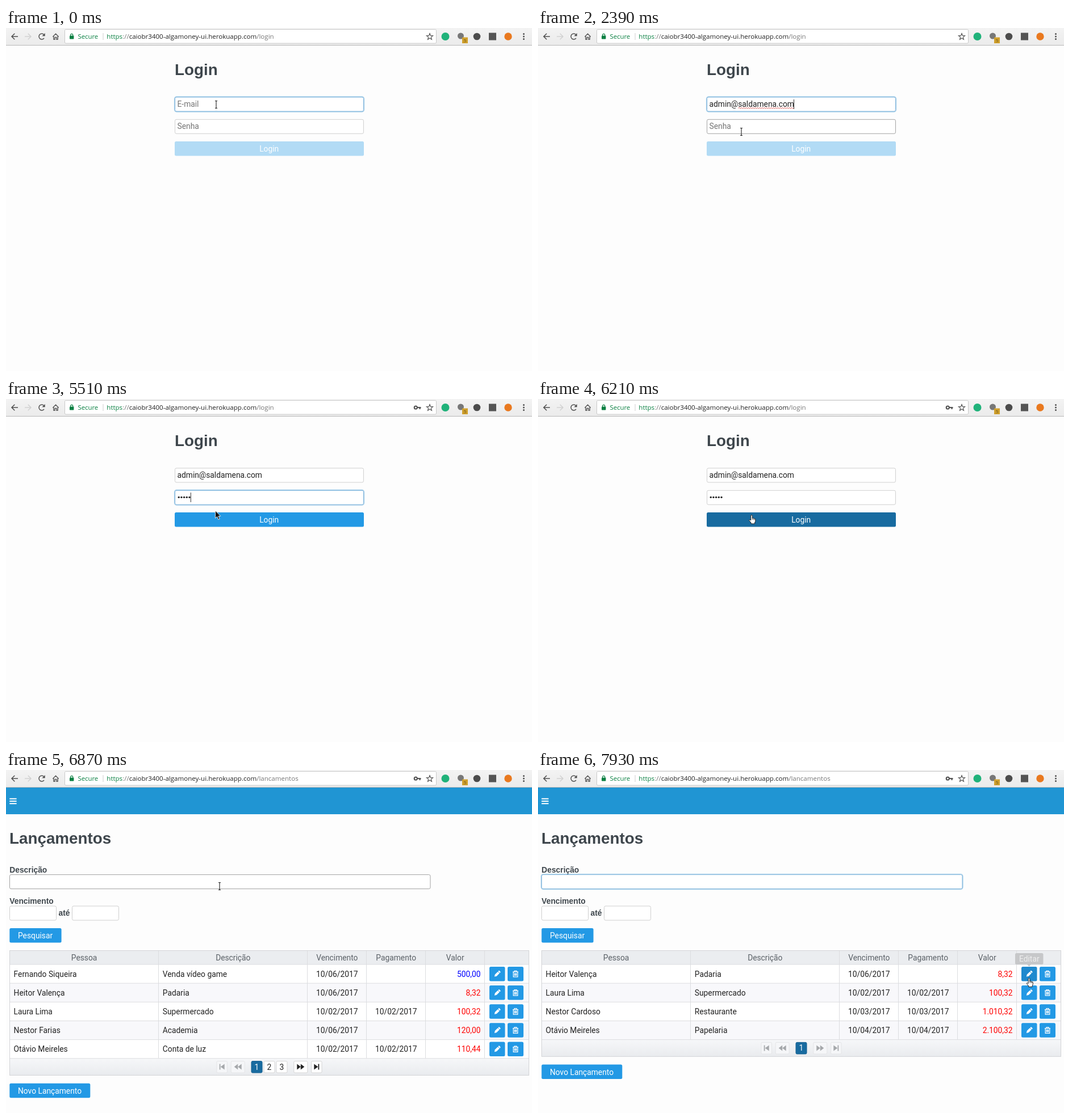
These frames come from a looping animation (926 px wide and 605 px high, 8000 ms). An HTML page:

```html
<!DOCTYPE html>
<html lang="pt">
<head>
<meta charset="utf-8">
<title>Login</title>
<style>
html, body { margin: 0; width: 100%; height: 100%; overflow: hidden; background: #fdfdfd; }
svg { display: block; width: 926px; height: 605px; }
text { font: 13.8px Roboto, sans-serif; fill: #222; white-space: pre; }
.bar { font: 11.55px "Open Sans", sans-serif; }
.h1 { font: bold 27.8px "Liberation Sans", Arial, sans-serif; fill: #3e464c; }
.label { font: bold 13.8px "Liberation Sans", Arial, sans-serif; fill: #3e464c; }
.head { fill: #5b6167; }
.hint { fill: #757575; }
.white { fill: #fff; }
.mid { text-anchor: middle; }
.end { text-anchor: end; }
</style>
</head>
<body>
<svg id="stage" viewBox="0 0 926 605">
  <defs>
    <linearGradient id="chrome" x2="0" y2="1"><stop stop-color="#f3f3f3"/><stop offset="1" stop-color="#ebebeb"/></linearGradient>
    <linearGradient id="pager" x2="0" y2="1"><stop stop-color="#f6f7f9"/><stop offset="1" stop-color="#e9ebee"/></linearGradient>
  </defs>
  <g id="page"></g>
  <g id="browser"></g>
  <g id="mouse"></g>
</svg>
<script>
const LOOP = 8000;
const BLUE = '#2399e5', HOVER = '#1f89ce', PRESSED = '#186ba0', FADED = '#b2dbf5';
const EMAIL = 'admin@saldamena.com';

// Each step keeps the values of the one before it.
const STEPS = [
  [0, { view: 'login', focus: 'email', caret: 0, typed: 0, dots: 0, key: 0, hover: '', button: FADED, mouse: ['beam', 370, 135] }],
  [680, { caret: 1 }],
  [1050, { caret: 0 }],
  [1410, { caret: 1, typed: 1 }],
  [1710, { caret: 0, mouse: ['beam', 370, 162] }],
  [2090, { hover: 'senha', mouse: ['beam', 361, 175] }],
  [2390, { caret: 1, mouse: ['beam', 358, 183] }],
  [2760, { focus: 'senha' }],
  [3100, { caret: 0 }],
  [3770, { caret: 1, dots: 1, key: 1, button: BLUE }],
  [4130, { dots: 3 }],
  [4490, { dots: 5 }],
  [5170, { caret: 0 }],
  [5510, { caret: 1, hover: '', mouse: ['arrow', 368.5, 197] }],
  [5830, { button: HOVER, mouse: ['hand', 375, 206] }],
  [6210, { focus: '', button: PRESSED, mouse: ['hand', 376, 205] }],
  [6540, { dots: 0, button: HOVER }],
  [6870, { view: 'list', hover: 'desc', result: 'all', tip: 0, mouse: ['beam', 376, 205] }],
  [7550, { focus: 'desc', hover: '', caret: 1, result: 'found', mouse: ['arrow', 845, 382] }],
  [7930, { caret: 0, tip: 1, mouse: ['hand', 864.5, 367.5] }]
];
let last = {};
const states = STEPS.map(([at, change]) => last = { ...last, ...change, at });

const RESULTS = {
  all: [
    ['Fernando Siqueira', 'Venda vídeo game', '10/06/2017', '', '500,00'],
    ['Heitor Valença', 'Padaria', '10/06/2017', '', '8,32'],
    ['Laura Lima', 'Supermercado', '10/02/2017', '10/02/2017', '100,32'],
    ['Nestor Farias', 'Academia', '10/06/2017', '', '120,00'],
    ['Otávio Meireles', 'Conta de luz', '10/02/2017', '10/02/2017', '110,44']
  ],
  found: [
    ['Heitor Valença', 'Padaria', '10/06/2017', '', '8,32'],
    ['Laura Lima', 'Supermercado', '10/02/2017', '10/02/2017', '100,32'],
    ['Nestor Cardoso', 'Restaurante', '10/03/2017', '10/03/2017', '1.010,32'],
    ['Otávio Meireles', 'Papelaria', '10/04/2017', '10/04/2017', '2.100,32']
  ]
};

const text = (x, y, s, cls = '', more = '') => `<text x="${x}" y="${y}" class="${cls}" ${more}>${s}</text>`;
const rect = (x, y, w, h, fill, more = '') => `<rect x="${x}" y="${y}" width="${w}" height="${h}" fill="${fill}" ${more}/>`;
const path = (d, stroke, width = 1, fill = 'none') => `<path d="${d}" stroke="${stroke}" stroke-width="${width}" fill="${fill}"/>`;
const disc = (x, y, r, fill) => `<circle cx="${x}" cy="${y}" r="${r}" fill="${fill}"/>`;
const at = (x, y, s) => `<g transform="translate(${x} ${y})">${s}</g>`;
const button = (x, y, w, fill, h = 25.5) => rect(x, y, w, h, fill, 'rx="2.5"');
const caret = (x, y) => rect(x, y, 1, 17, '#333');

function field(x, y, w, mode) {
  const line = { focus: '#7fb3da', hover: '#a3a3a3' }[mode] || '#cfcfcf';
  const glow = mode === 'focus'
    ? rect(x, y, w, 25, 'none', 'rx="3" stroke="#1f89ce" stroke-opacity=".16" stroke-width="4"') +
      rect(x, y, w, 25, 'none', 'rx="3" stroke="#1f89ce" stroke-opacity=".3" stroke-width="2.4"') : '';
  return glow + rect(x, y, w, 25, '#fff', `rx="2.5" stroke="${line}"`);
}
const mode = (s, name) => s.focus === name ? 'focus' : s.hover === name ? 'hover' : '';

function squiggle(x, end, y) {
  let d = `M${x} ${y}`;
  for (let up = 1; x < end; up = -up) d += `L${x += 2} ${y - up}`;
  return path(d, '#d8403c', 0.9);
}

function login(s) {
  let out = text(297, 83, 'Login', 'h1') +
    field(297.5, 122, 332, mode(s, 'email')) + field(297.5, 161.3, 332, mode(s, 'senha')) +
    button(297, 200, 333, s.button) + text(463.2, 217.8, 'Login', 'white mid');
  out += s.typed ? text(301.5, 139.2, EMAIL) : text(301.5, 139.2, 'E-mail', 'hint');
  if (s.typed && s.focus === 'email') out += squiggle(352.5, 449, 141.3);
  if (!s.dots) out += text(301.5, 178.4, 'Senha', 'hint');
  for (let i = 0; i < s.dots; i++) out += disc(304.2 + i * 4.7, 173.3, 1.65, '#222');
  if (s.caret && s.focus === 'email') out += caret(s.typed ? 450 : 301.7, 126);
  if (s.caret && s.focus === 'senha') out += caret(301.4 + s.dots * 4.68, 165);
  return out;
}

const pencil = `<g transform="rotate(45)">${rect(-2.1, -6.6, 4.2, 2.4, '#fff', 'rx=".8"')}${path('M-2.1-3.5H2.1V3.6L0 7-2.1 3.6Z', 'none', 0, '#fff')}</g>`;
const trash = path('M-5-3.6H5M-2-3.8V-5.4H2V-3.8M-3.8-3.4V5H3.8V-3.4M-1.6-1.6V3.2M0-1.6V3.2M1.6-1.6V3.2', '#fff', 1.25);

const skips = {
  first: 'M-4.5-5H-2.7V5H-4.5ZM4.5-5V5L-2.5 0Z',
  prev: 'M0-5V5L-6.5 0ZM6.5-5V5L0 0Z',
  next: 'M0-5V5L6.5 0ZM-6.5-5V5L0 0Z',
  last: 'M4.5-5H2.7V5H4.5ZM-4.5-5V5L2.5 0Z'
};

function pager(y, pages) {
  const cx = 463.5, half = pages * 11;
  const skip = (name, dx, w, on) => rect(cx + dx - w / 2, y - 10, w, 20.5, on ? '#fff' : '#f5f6f8', `rx="2" stroke="${on ? '#d5d5d5' : '#e4e5e7'}"`) +
    at(cx + dx, y, path(skips[name], 'none', 0, on ? '#222' : '#a5a8ab'));
  const more = pages > 1;
  let out = skip('first', -half - 50.3, 18.5, 0) + skip('prev', -half - 22.3, 24, 0) +
    skip('next', half + 22.3, 24, more) + skip('last', half + 50.3, 18.5, more);
  for (let i = 0; i < pages; i++) {
    const x = cx - half + 11 + i * 22;
    out += rect(x - 9.5, y - 10, 19, 20.5, i ? '#fff' : PRESSED, `rx="2" stroke="${i ? '#d5d5d5' : '#156090'}"`) +
      text(x, y + 5, i + 1, i ? 'mid' : 'white mid');
  }
  return out;
}

function table(s) {
  const rows = RESULTS[s.result], top = 343, step = 33.15;
  const bottom = top + rows.length * step, edges = [268.5, 530.5, 634.5, 738.5, 842.5];
  let out = rect(6.5, 318.5, 914, 24.5, '#ebedf0');
  ['Pessoa', 'Descrição', 'Vencimento', 'Pagamento', 'Valor'].forEach((name, i) =>
    out += text([137.6, 399.8, 582.8, 686.7, 790.7][i], 335.8, name, 'head mid'));
  let lines = 'M6.5 343H920.5';
  rows.forEach(([who, what, due, paid, value], i) => {
    const y = top + i * step, base = y + 21.6;
    out += rect(6.5, y, 914, step, i % 2 ? '#f8f8fb' : '#fff') +
      text(13.6, base, who) + text(275.8, base, what) +
      text(582.8, base, due, 'mid') + text(686.7, base, paid, 'mid') +
      text(835.6, base, value, 'end', `style="fill:${value === '500,00' ? '#00f' : '#f00'}"`) +
      button(851, y + 3.9, 27.5, s.tip && !i ? HOVER : BLUE) + at(864.8, y + 16.6, pencil) +
      button(883, y + 3.9, 28, BLUE) + at(897, y + 16.8, trash);
    lines += `M6.5 ${y + step}H920.5`;
  });
  edges.forEach(x => lines += `M${x} 318.5V${bottom}`);
  return out + rect(6.5, bottom, 914, 29.7, 'url(#pager)') + path(lines, '#dcdde0') +
    rect(6.5, 318.5, 914, bottom + 29.7 - 318.5, 'none', 'stroke="#d3d4d7"') +
    pager(bottom + 14.8, s.result === 'all' ? 3 : 1) +
    button(6.3, bottom + 44, 142, BLUE) + text(21, bottom + 61.9, 'Novo Lançamento', 'white');
}

function list(s) {
  let out = rect(0, 31, 926, 47, '#2095d3') + path('M6.3 50.8H18.6M6.3 55H18.6M6.3 59.2H18.6', '#fff', 2.1) +
    text(6, 129.8, 'Lançamentos', 'h1') +
    text(6.3, 180.6, 'Descrição', 'label') + field(6.5, 184.6, 740.5, mode(s, 'desc')) +
    text(6.3, 236.2, 'Vencimento', 'label') + field(6.5, 240, 82, '') +
    text(92.5, 257, 'até', 'label') + field(116.5, 240, 82, '') +
    button(6.3, 279, 91.3, BLUE) + text(21, 297, 'Pesquisar', 'white') + table(s);
  if (s.focus === 'desc' && s.caret) out += caret(11, 188);
  if (s.tip) out += rect(840, 323, 49.5, 20, '#c6c7c9', 'rx="2.5"') + path('M861 343H868L864.5 346.5Z', 'none', 0, '#c6c7c9') +
    text(864.8, 338, 'Editar', 'mid', 'style="fill:#efefef"');
  return out;
}

function browser(s) {
  const ink = '#505050', tail = s.view === 'list' ? '/lancamentos' : '/login';
  const arrow = (x, color) => at(x, 15, path('M6 0H-5M.3-5.2L-5 0 .3 5.2', color, 1.5));
  const star = Array.from({ length: 10 }, (_, i) => {
    const r = i % 2 ? 2.5 : 5.9, a = i * Math.PI / 5;
    return `${(r * Math.sin(a)).toFixed(2)} ${(-r * Math.cos(a)).toFixed(2)}`;
  }).join('L');
  let out = rect(0, 0, 926, 30, 'url(#chrome)') + rect(0, 30, 926, 1, '#b9b9b9') +
    rect(103.5, 2.5, 654, 24.5, '#fff', 'rx="2" stroke="#c9c9c9"') +
    arrow(15, ink) + `<g transform="matrix(-1 0 0 1 79 0)">${arrow(40, '#d2d2d2')}</g>` +
    at(63, 15, path('M4 3A5 5 0 1 1 3.6-3.5', ink, 1.5) + path('M5.7-6V-.8H.5Z', 'none', 0, ink)) +
    at(87.5, 15, path('M-5.2 .4L0-4.8 5.2 .4M-3.6-.6V5H-1.4V1.4H1.4V5H3.6V-.6', ink, 1.3)) +
    rect(112, 13.5, 7.4, 6, '#0b8043', 'rx=".8"') + path('M113.7 14V12.4A2 2 0 0 1 117.7 12.4V14', '#0b8043', 1.2) +
    text(126.4, 19, 'Secure', 'bar', 'style="fill:#0b8043;font-size:11.4px"') + rect(170.5, 9, 1, 12, '#d0d0d0') +
    text(177.3, 19, `<tspan fill="#0b8043">https</tspan><tspan fill="#777">://</tspan>caiobr3400-algamoney-ui.herokuapp.com<tspan fill="#777">${tail}</tspan>`, 'bar') +
    at(746, 15.4, path(`M${star}Z`, ink, 1.15)) +
    disc(773.5, 15, 7, '#20b27a') + disc(800.5, 14, 5.5, '#777') +
    rect(803, 16.5, 10, 10.5, '#d0a02c') + text(808, 25, '5', 'bar mid', 'style="font-size:8px;fill:#614d1a"') +
    disc(829, 15, 6.3, '#4c4c4c') + rect(850, 8.5, 13, 13, '#555') + disc(884, 15, 6.7, '#e9791f');
  [10.6, 15, 19.4].forEach(y => out += disc(911.5, y, 1.5, ink));
  if (s.key) out += `<circle cx="721.3" cy="15" r="2.6" fill="none" stroke="${ink}" stroke-width="2"/>` + path('M724 15H730.5M728.6 15V18', ink, 2.1);
  return out;
}

const cursors = {
  beam: path('M-2-6.5H-.7L0-5.8 .7-6.5H2M0-5.8V5.8M-2 6.5H-.7L0 5.8 .7 6.5H2', '#222', 1.1),
  arrow: path('M0 0V13.2L3.1 10.4 5.3 15.6 7.6 14.6 5.4 9.6H9.4Z', '#fff', 0.8, '#111'),
  hand: path('M-1.3 9V1A1.3 1.3 0 0 1 1.3 1V5.2Q2.6 4.4 3.3 5.7 4.6 5 5.1 6.3 6.8 6 6.8 7.6V10.5L5.6 13V15H-1V13.2L-4.3 9.2Q-4.2 7-1.3 9Z', '#222', 1, '#fff') +
    path('M1.3 5V8.2M3.3 6V8.4M5.1 6.5V8.6', '#222', 0.7)
};

const put = (id, markup) => document.getElementById(id).innerHTML = markup;
let shown;
function draw() {
  const now = performance.now() % LOOP;
  const s = states.findLast(state => state.at <= now);
  if (s !== shown) {
    shown = s;
    put('page', s.view === 'login' ? login(s) : list(s));
    put('browser', browser(s));
    const [kind, x, y] = s.mouse;
    put('mouse', at(x, y, cursors[kind]));
  }
  requestAnimationFrame(draw);
}
draw();
</script>
</body>
</html>
```
